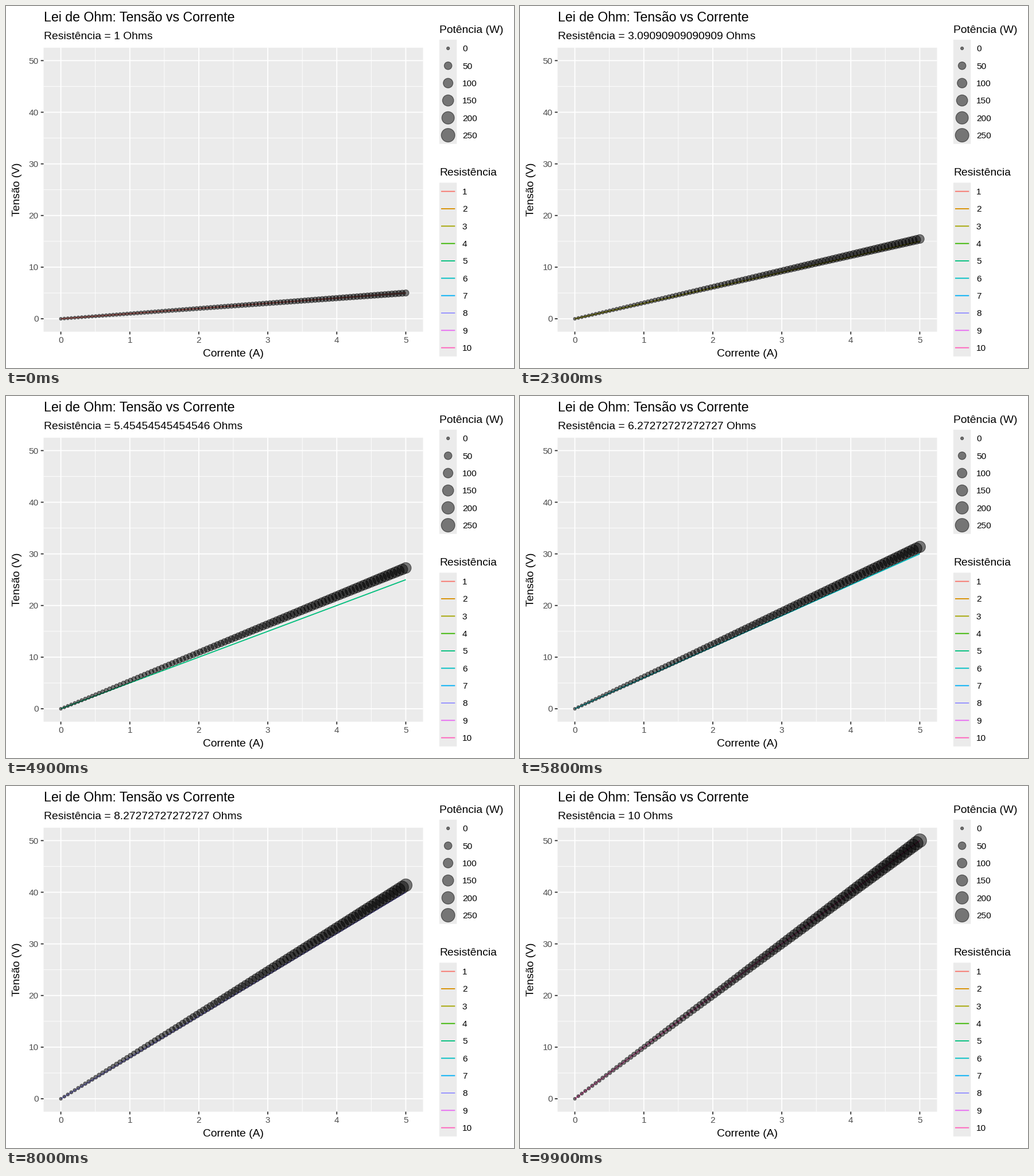
Animation of 885 by 632 pixels, one loop 10000 ms. Source, as a matplotlib script:

```python
import matplotlib.pyplot as plt
import numpy as np
from matplotlib.animation import FuncAnimation
from matplotlib.patches import Rectangle

plt.rcParams["font.family"] = "Liberation Sans"

W, H, DPI = 885, 632, 100
PX = 72 / DPI                 # points per pixel
RES = 126.4                   # resolution that sets text, line and dot sizes
FRAMES, INTERVAL = 100, 100

LEFT, RIGHT, TOP, BOTTOM = 65.5, 726.5, 72.8, 568.6
KEY, KEY_X = 30.33, 755.0
BASE = 11 * RES / 72
SMALL, BIG = 0.8 * BASE, 1.2 * BASE
MAJOR, MINOR = 1.87, 0.94
GREY = "#EBEBEB"
HUES = ["#F8766D", "#D89000", "#A3A500", "#39B600", "#00BF7D",
        "#00BFC4", "#00B0F6", "#9590FF", "#E76BF3", "#FF62BC"]

fig = plt.figure(figsize=(W / DPI, H / DPI), dpi=DPI, facecolor="white")
ax = fig.add_axes([0, 0, 1, 1])
ax.set_xlim(0, W)
ax.set_ylim(H, 0)
ax.axis("off")


def px_x(amps):
    return LEFT + (RIGHT - LEFT) * (amps + 0.25) / 5.5


def px_y(volts):
    return BOTTOM - (BOTTOM - TOP) * (volts + 2.5) / 55


def rect(x, y, w, h):
    ax.add_patch(Rectangle((x, y), w, h, fc=GREY, ec="none", snap=False, zorder=0))


def line(xs, ys, color, width, z=1):
    return ax.plot(xs, ys, color=color, lw=width * PX, snap=False, zorder=z,
                   solid_capstyle="butt")[0]


def label(x, y, s, size, color="black", ha="left", **kw):
    return ax.text(x, y, s, fontsize=size * PX, color=color, ha=ha,
                   va=kw.pop("va", "baseline"), **kw)


def dots(xs, ys, sizes):
    area = (0.75 * diameter(sizes) * RES / 72 * PX) ** 2
    return ax.scatter(xs, ys, s=area, c="black", alpha=0.5,
                      linewidths=1.244 * PX, zorder=3)


def diameter(size):
    return size * 72.27 / 25.4 + 0.945


def dot_size(power):
    return 1 + 5 * np.sqrt(power / 250)


# Panel with grid and axes
rect(LEFT, TOP, RIGHT - LEFT, BOTTOM - TOP)
for v in np.arange(0.5, 5):
    line([px_x(v)] * 2, [TOP, BOTTOM], "white", MINOR)
    line([LEFT, RIGHT], [px_y(10 * v)] * 2, "white", MINOR)
for v in range(6):
    x, y = px_x(v), px_y(10 * v)
    line([x, x], [TOP, BOTTOM], "white", MAJOR)
    line([LEFT, RIGHT], [y, y], "white", MAJOR)
    line([x, x], [BOTTOM, BOTTOM + 4.8], "#333333", MAJOR)
    line([LEFT - 4.8, LEFT], [y, y], "#333333", MAJOR)
    label(x, 588.3, str(v), SMALL, "#4D4D4D", "center")
    label(56.8, y + 5.4, str(10 * v), SMALL, "#4D4D4D", "right")

label(LEFT, 27, "Lei de Ohm: Tensão vs Corrente", BIG)
subtitle = label(LEFT, 58, "", BASE)
label((LEFT + RIGHT) / 2, 612, "Corrente (A)", BASE, ha="center")
label(24.2, (TOP + BOTTOM) / 2, "Tensão (V)", BASE, ha="right", va="center",
      rotation=90, rotation_mode="default").set(
    ha="center", va="baseline", rotation_mode="anchor")


def legend(title, title_y, top, names):
    label(KEY_X, title_y, title, BASE)
    rect(KEY_X, top, KEY, KEY * len(names))
    mids = top + KEY * (np.arange(len(names)) + 0.5)
    for name, y in zip(names, mids):
        label(KEY_X + KEY + 9.6, y + 5.4, str(name), SMALL)
    return mids


watts = np.arange(0, 251, 50)
mids = legend("Potência (W)", 46.7, 58.8, watts)
dots(np.full(6, KEY_X + KEY / 2), mids, dot_size(watts))
for hue, y in zip(HUES, legend("Resistência", 296.4, 308.5, range(1, 11))):
    line([KEY_X + 0.1 * KEY, KEY_X + 0.9 * KEY], [y, y], hue, MAJOR)

# Moving parts
amps = np.linspace(0, 5, 100)
trend = line([], [], HUES[0], MAJOR, z=2)
points = dots(px_x(amps), px_y(amps), dot_size(amps ** 2))


def update(i):
    ohms = 1 + i * (9 / 99)
    step, part = divmod(i, 11)
    low, t = step + 1, part / 11
    subtitle.set_text(f"Resistência = {ohms:.15g} Ohms")
    trend.set_data(px_x(amps), px_y(amps * low))
    trend.set_color(HUES[step])
    size = (1 - t) * dot_size(amps ** 2 * low) + t * dot_size(amps ** 2 * (low + 1))
    points.set_offsets(np.column_stack([px_x(amps), px_y(amps * ohms)]))
    points.set_sizes((0.75 * diameter(size) * RES / 72 * PX) ** 2)
    return subtitle, trend, points


anim = FuncAnimation(fig, update, frames=FRAMES, interval=INTERVAL,
                     init_func=lambda: update(0), repeat=True, repeat_delay=0)
plt.show()
```
